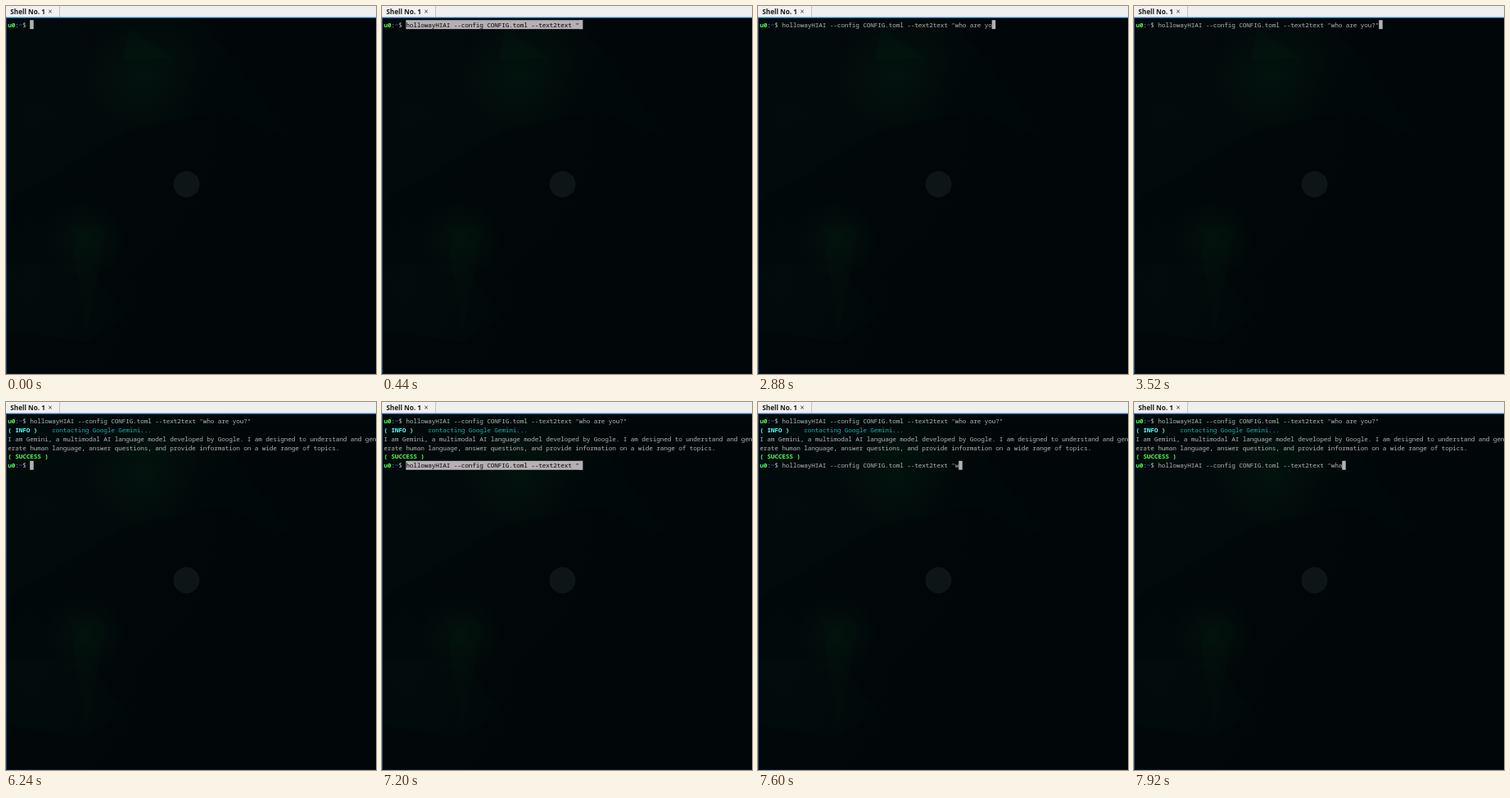
Recreate the animation shown at these times as an HTML page with a canvas. Size 452 by 449 pixels, loop 8 s.

```html
<!DOCTYPE html>
<html lang="en">
<head>
<meta charset="utf-8">
<title>Shell</title>
<style>
  html, body { margin: 0; width: 100%; height: 100%; overflow: hidden; background: #010608; }
  canvas { display: block; width: 452px; height: 449px; }
</style>
</head>
<body>
<canvas></canvas>
<script>
const W = 452, H = 449, LOOP = 8000;
const canvas = document.querySelector('canvas');
const ctx = canvas.getContext('2d');
const ratio = window.devicePixelRatio || 1;
canvas.width = W * ratio;
canvas.height = H * ratio;

// Terminal grid: 7 x 17 cells of 12px type, shown at a reduced scale.
const SCALE = 9 / 14, CELL_W = 7, CELL_H = 17, BASELINE = 13.3;
const LEFT = 2.2, TOP = 17.2;
const GREY = '#b2b2b2', SELECTED = '#b5b0b3', GREEN = '#54ff54';
const CYAN = '#54ffff', TEAL = '#18b2b2', BLUE = '#5454ff', INK = '#020607';

const PROMPT_COLS = 6;
const COMMAND = 'hollowayHIAI --config CONFIG.toml --text2text "';
const FIRST_KEYS = [[2880, 'who are yo'], [3080, 'u'], [3240, '?'], [3520, '"']];
const SECOND_KEYS = [[7600, 'w'], [7760, 'h'], [7920, 'a']];
const ENTER = 3720, CONTACT = 3800, ANSWER = 6240;
const REPLY = [
  'I am Gemini, a multimodal AI language model developed by Google. I am designed to understand and gen',
  'erate human language, answer questions, and provide information on a wide range of topics.'
];

function write(col, row, text, color = GREY, bold = false) {
  ctx.font = `${bold ? 'bold ' : ''}12px "Noto Sans Mono", monospace`;
  ctx.fillStyle = color;
  [...text].forEach((ch, i) => {
    if (ch !== ' ') ctx.fillText(ch, (col + i) * CELL_W, row * CELL_H + BASELINE);
  });
}

function block(col, row, cols = 1, color = GREY) {
  ctx.fillStyle = color;
  ctx.fillRect(col * CELL_W, row * CELL_H, cols * CELL_W, CELL_H);
}

// Draws a prompt with its pasted and typed command; returns the cursor column.
function commandLine(row, t, pasteTime, keys) {
  write(0, row, 'u0', GREEN, true);
  write(2, row, ':');
  write(3, row, '~', BLUE, true);
  write(4, row, '$');
  if (t < pasteTime) return PROMPT_COLS;
  const typed = keys.filter(([time]) => t >= time).map(([, text]) => text).join('');
  const text = COMMAND + typed;
  if (!typed) block(PROMPT_COLS, row, text.length + 1, SELECTED);
  write(PROMPT_COLS, row, text, typed ? GREY : INK);
  return PROMPT_COLS + text.length;
}

function terminal(t) {
  ctx.save();
  ctx.translate(LEFT, TOP);
  ctx.scale(SCALE, SCALE);
  const end = commandLine(0, t, 440, FIRST_KEYS);
  if (t >= CONTACT) {
    write(0, 1, '( INFO )', CYAN, true);
    write(12, 1, 'contacting Google Gemini...', TEAL);
  }
  if (t >= ANSWER) {
    REPLY.forEach((line, i) => write(0, 2 + i, line));
    write(0, 4, '( SUCCESS )', GREEN, true);
    const col = commandLine(5, t, 7200, SECOND_KEYS);
    block(col, 5, 1, t >= 7200 && t < 7600 ? SELECTED : GREY);
  } else if (t >= CONTACT) block(0, 2);
  else if (t >= ENTER) block(0, 1);
  else block(end, 0, 1, t >= 440 && t < 2880 ? SELECTED : GREY);
  ctx.restore();
}

function glow(x, y, radius, rgb, alpha) {
  const g = ctx.createRadialGradient(x, y, 0, x, y, radius);
  g.addColorStop(0, `rgba(${rgb},${alpha})`);
  g.addColorStop(1, `rgba(${rgb},0)`);
  ctx.fillStyle = g;
  ctx.fillRect(x - radius, y - radius, 2 * radius, 2 * radius);
}

function shard(path, color) {
  ctx.fillStyle = color;
  ctx.fill(new Path2D(path));
}

function backdrop() {
  ctx.fillStyle = '#010608';
  ctx.fillRect(0, 0, W, H);
  glow(40, 130, 230, '20,60,55', 0.07);
  glow(30, 350, 130, '20,60,50', 0.07);
  shard('M0 15H235L262 45L350 163L262 128L150 150L0 240Z', 'rgba(20,60,50,.03)');
  shard('M0 315L100 317L148 378L98 410L0 395Z', 'rgba(20,60,50,.03)');
  glow(168, 85, 75, '0,60,25', 0.17);
  glow(225, 45, 60, '0,50,25', 0.06);
  glow(98, 285, 50, '0,60,25', 0.16);
  shard('M150 27L207 66L190 64L141 66Z', 'rgba(0,60,30,.07)');
  shard('M78 268L124 268L98 405L84 310Z', 'rgba(0,60,30,.05)');
  ctx.fillStyle = '#0e1517';
  ctx.beginPath();
  ctx.arc(220.5, 217.5, 16, 0, 2 * Math.PI);
  ctx.fill();
}

function tabBar() {
  ctx.fillStyle = '#eeefef';
  ctx.fillRect(0, 0, W, 14);
  ctx.fillStyle = '#f1f1f1';
  ctx.fillRect(0, 0, 65, 14);
  ctx.fillStyle = '#b6b8b9';
  ctx.fillRect(65, 0, 0.8, 13.6);
  ctx.fillStyle = '#2f75c8';
  ctx.fillRect(0, 13.6, W, 1.2);
  ctx.fillStyle = '#1c4c8c';
  ctx.fillRect(0, 14, 0.9, H - 14);
  ctx.fillStyle = '#0b2240';
  ctx.fillRect(0, H - 0.7, W, 0.7);

  ctx.save();
  ctx.translate(5.3, 9.5);
  ctx.scale(SCALE, SCALE);
  ctx.font = 'bold 12.7px "Noto Sans", sans-serif';
  ctx.fillStyle = '#18191a';
  ctx.fillText('Shell No. 1', 0, 0);
  ctx.restore();

  ctx.strokeStyle = '#333';
  ctx.lineWidth = 0.9;
  ctx.stroke(new Path2D('M52.2 4.8L55.8 8.4M55.8 4.8L52.2 8.4'));
}

const start = performance.now();
function frame() {
  const t = (performance.now() - start) % LOOP;
  ctx.setTransform(ratio, 0, 0, ratio, 0, 0);
  backdrop();
  tabBar();
  terminal(t);
  requestAnimationFrame(frame);
}
frame();
</script>
</body>
</html>
```
